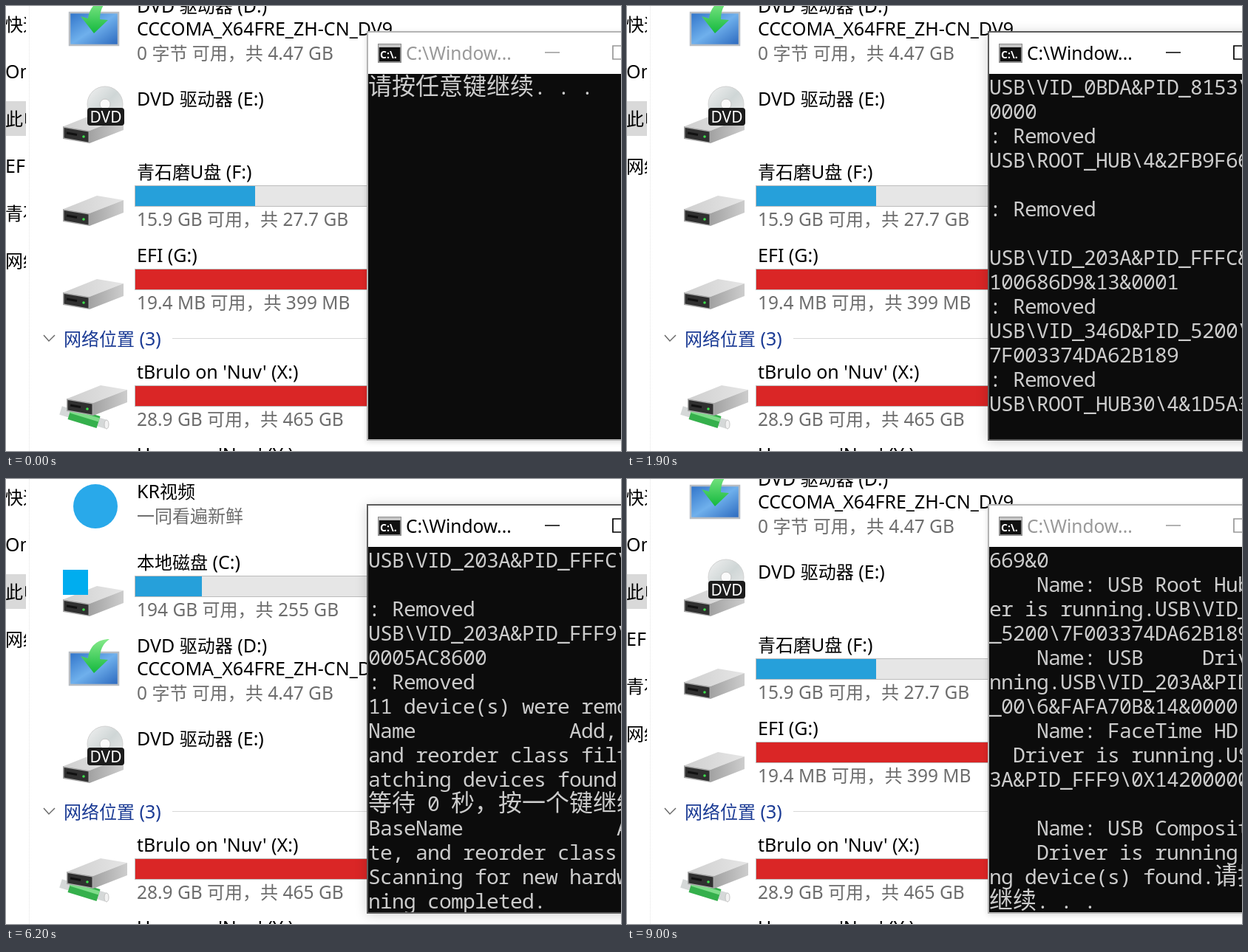
An HTML page for the animation above (9100 ms loop, 832 px wide and 603 px high).

```html
<!DOCTYPE html>
<html lang="zh-CN">
<head>
<meta charset="utf-8">
<title>Device rescan</title>
<style>
html, body { margin: 0; width: 100%; height: 100%; overflow: hidden; background: #fff; }
#stage {
  position: absolute; left: 0; top: 0; width: 832px; height: 603px; overflow: hidden; background: #fff;
  font: 25px/30px "Noto Sans", "Open Sans", "Noto Sans CJK SC", sans-serif; color: #000;
}
#stage div, #stage svg { position: absolute; }
b { font: normal .96em/0 "Noto Sans CJK SC", "Noto Sans CJK", sans-serif; }
.label { left: 177px; white-space: pre; }
.dim { color: #6d6d6d; font-size: 24.5px; }
.dim b { font-size: 24px; }
.bar { left: 174px; width: 380px; height: 27px; border: 1px solid #bcbcbc; background: #e6e6e6; }
.bar div { height: 27px; }

#side { left: 0; top: 0; width: 27px; height: 603px; overflow: hidden; }
#side .label { left: -1px; }
#picked { top: 129px; width: 27px; height: 47px; background: #d9d9d9; }
#rule { left: 31px; top: 0; height: 603px; border-left: 1px dotted #e4e4e4; }
#list, #net { left: 0; top: 0; width: 832px; height: 603px; }
#list svg, #net svg { left: 0; top: 0; overflow: visible; }
#list.full { top: -226px; }
#list:not(.full) .usb, #side:not(.full) .usb { display: none; }
#side:not(.full) .last { margin-top: -128px; }
#net .head { left: 78px; color: #1a3a94; }
#line { left: 225px; top: 450px; width: 300px; height: 1px; background: #d8d8d8; }

#win {
  left: 488px; top: 34px; width: 400px; height: 551px; border: 2px solid #b4b4b4;
  background: #fff; color: #999; box-shadow: 0 2px 7px rgba(0,0,0,.14);
}
#win.active { color: #000; border-color: #5c5c5c; box-shadow: 0 2px 15px rgba(0,0,0,.18); }
#title { left: 51px; top: 13px; font-size: 24.5px; }
#win svg { left: 0; top: 0; }
#term {
  left: 0; top: 56px; width: 400px; height: 495px; overflow: hidden; background: #0c0c0c; color: #ccc;
  font: 300 28px/33px "Noto Sans Mono", "DejaVu Sans Mono", monospace; letter-spacing: -.8px;
}
#rows { left: 0; top: 1px; white-space: pre; }
#rows p { margin: 0; height: 33px; }
#term b { font-size: 32px; font-weight: 300; letter-spacing: 0; }
#cursor { top: 487px; width: 16px; height: 8px; background: #fff; }
</style>
</head>
<body>
<div id="stage">
  <div id="side"><div id="picked"></div></div>
  <div id="rule"></div>

  <div id="list">
    <svg width="832" height="700">
      <defs>
        <linearGradient id="top" x2="1"><stop stop-color="#cfcfcf"/><stop offset="1" stop-color="#e6e6e6"/></linearGradient>
        <linearGradient id="edge" x2="1"><stop stop-color="#a2a2a2"/><stop offset="1" stop-color="#cdcdcd"/></linearGradient>
        <linearGradient id="screen" x2="1" y2="1"><stop stop-color="#2f73c9"/><stop offset=".5" stop-color="#6fb0ec"/><stop offset="1" stop-color="#2a67bd"/></linearGradient>
        <linearGradient id="disc" x2="1" y2="1"><stop stop-color="#f1f1f1"/><stop offset=".5" stop-color="#cfd6d6"/><stop offset="1" stop-color="#ececec"/></linearGradient>
        <linearGradient id="leaf" y2="1" x2="0"><stop stop-color="#86ea8a"/><stop offset="1" stop-color="#14b83e"/></linearGradient>
        <g id="drive">
          <path d="M1 18 46 0 82 6 36 24Z" fill="url(#top)"/>
          <path d="M36 24 82 6V23L36 41Z" fill="url(#edge)"/>
          <path d="M0 18 36 24V41L0 35Z" fill="#a8a8a8"/>
          <path d="M1.500 20 34.500 25.500V39.500L1.500 33.500Z" fill="#303030"/>
          <path d="M5 27 19 29.500" stroke="#111" stroke-width="3"/>
          <circle cx="28" cy="32" r="1.800" fill="#3be04a"/>
        </g>
      </defs>
      <circle cx="121" cy="37" r="30" fill="#29a9ea"/>
      <use href="#drive" x="77" y="145"/>
      <path d="M77 123H111V157H77Z" fill="#00adef"/>
      <path d="M86 235H152V279H86Z" fill="url(#screen)" stroke="#b7bcc2" stroke-width="2.500"/>
      <path d="M140 217C124 217 113 226 111 243L101 240 119 263 138 245 127 244C127 232 131 223 140 217Z" fill="url(#leaf)"/>
      <use href="#drive" x="77" y="371"/>
      <circle cx="134" cy="359" r="24" fill="url(#disc)" stroke="#d2d2d2"/>
      <circle cx="134" cy="359" r="7" fill="#fafafa" stroke="#c4c4c4"/>
      <rect x="110" y="364" width="50" height="24" rx="4" fill="#1c1c1c"/>
      <text x="135" y="383.500" text-anchor="middle" font-size="21" fill="#fff">DVD</text>
      <g class="usb"><use href="#drive" x="77" y="483"/><use href="#drive" x="77" y="596"/></g>
    </svg>
  </div>

  <div id="net">
    <div id="line"></div>
    <svg width="832" height="603" fill="none">
      <path d="M51 446 58 454 66 446" stroke="#6b6b6b" stroke-width="1.500"/>
      <path d="M74 548 136 567" stroke="#d5d8d8" stroke-width="12"/>
      <path d="M86 552 125 564" stroke="#35b04c" stroke-width="17"/>
      <path d="M87 549 126 561" stroke="#7fdc8a" stroke-width="5"/>
      <ellipse cx="136" cy="567" rx="3" ry="6" fill="#f2f2f2" stroke="#c4c4c4"/>
      <use href="#drive" x="82" y="514"/>
    </svg>
  </div>

  <div id="win">
    <svg width="342" height="56" fill="none">
      <path d="M14 16H44V40H14Z" fill="#111" stroke="#8c8c8c" stroke-width="2"/>
      <path d="M14 18H44" stroke="#c6c6c6" stroke-width="4"/>
      <text x="16" y="35" font-size="14" font-weight="700" fill="#fff">C:\.</text>
      <path d="M239 27H259M331 18H351V36H331Z" stroke="currentColor" stroke-width="1.700"/>
    </svg>
    <div id="title">C:\Window...</div>
    <div id="term"><div id="rows"></div><div id="cursor"></div></div>
  </div>
</div>

<script>
const $ = id => document.getElementById(id);
const LOOP = 9100, ROWS = 15;

// Wide characters get their own font and size.
const markup = s => s.replace(/&/g, '&amp;').replace(/[\u2e80-\uffef]+/g, '<b>$&</b>');

function add(parent, cls, top, html = '') {
  const el = document.createElement('div');
  el.className = cls;
  el.style.top = top + 'px';
  el.innerHTML = html;
  return parent.appendChild(el);
}
// y is the middle of the text line.
const label = (parent, y, text, cls = '') => add(parent, 'label ' + cls, y - 16, markup(text));

function volume(parent, y, name, space, used, color, cls = '') {
  label(parent, y, name, cls);
  add(parent, 'bar ' + cls, y + 18, `<div style="width:${used}px;background:${color}"></div>`);
  label(parent, y + 65, space, 'dim ' + cls);
}

const BLUE = '#26a0da', RED = '#da2626';
const side = $('side'), list = $('list'), net = $('net');

label(side, 25, '快速访问');
label(side, 89, 'On');
label(side, 153, '此电脑');
label(side, 217, 'EFI (G:)', 'usb');
label(side, 281, '青石磨U盘', 'usb');
label(side, 345, '网络', 'last');

label(list, 17, 'KR视频');
label(list, 51, '一同看遍新鲜', 'dim');
volume(list, 113, '本地磁盘 (C:)', '194 GB 可用，共 255 GB', 90, BLUE);
label(list, 226, 'DVD 驱动器 (D:)');
label(list, 257, 'CCCOMA_X64FRE_ZH-CN_DV9');
label(list, 291, '0 字节 可用，共 4.47 GB', 'dim');
label(list, 352, 'DVD 驱动器 (E:)');
volume(list, 451, '青石磨U盘 (F:)', '15.9 GB 可用，共 27.7 GB', 162, BLUE, 'usb');
volume(list, 564, 'EFI (G:)', '19.4 MB 可用，共 399 MB', 361, RED, 'usb');

label(net, 451, '网络位置 (3)', 'head');
volume(net, 496, "tBrulo on 'Nuv' (X:)", '28.9 GB 可用，共 465 GB', 356, RED);
label(net, 608, "Users on 'Nuv' (Y:)");

const scan = String.raw` class filters.USB\ROO
4&1387C2E6&0
    Name: USB Root Hub
er is running.USB\VID_
_8153\0003B6000000
    Name: Realtek USB
The device has a probl
669&0
    Name: USB Root Hub
er is running.USB\VID_
_5200\7F003374DA62B189
    Name: USB     Driv
nning.USB\VID_203A&PID
_00\6&FAFA70B&14&0000
    Name: FaceTime HD
  Driver is running.US
3A&PID_FFF9\0X14200000

    Name: USB Composit
    Driver is running.`;

const log = String.raw`请按任意键继续. . .
BaseName             Add
${scan}
ing device(s) found.Ba
           Add, delete
order class filters.US
UB20\4&1387C2E6&0
                    :
USB\VID_203A&PID_FFFC&
100686D9&13&0000
: Removed
USB\VID_0BDA&PID_8153\
0000
: Removed
USB\ROOT_HUB\4&2FB9F66

: Removed

USB\VID_203A&PID_FFFC&
100686D9&13&0001
: Removed
USB\VID_346D&PID_5200\
7F003374DA62B189
: Removed
USB\ROOT_HUB30\4&1D5A3

: Removed
USB\VID_203A&PID_FFFC&
100686D9&13&0002
: Removed
USB\VID_203A&PID_FFFC\

: Removed
USB\VID_203A&PID_FFF9\
0005AC8600
: Removed
11 device(s) were remo
Name             Add,
and reorder class filt
atching devices found.
等待 # 秒，按一个键继续
BaseName             A
te, and reorder class
Scanning for new hardw
ning completed.BaseNam
      Add, delete, and
${scan}
ng device(s) found.请按
继续. . .`.split('\n');

// [time, lines written, characters of the last line if it is unfinished]
const steps = [
  [0, 1], [300, 9], [400, 25, 20],
  [700, 27], [800, 29], [900, 30], [1000, 32], [1100, 34], [1200, 37],
  [1500, 39], [1600, 40], [1700, 42], [1800, 43], [1900, 45],
  [2000, 48], [2100, 51], [2200, 54], [2300, 58], [2400, 60],
  [3900, 61], [4000, 62], [4100, 63], [6200, 64, 15], [7200, 66, 15],
  [7600, 68], [7700, 70], [7800, 72, 6],
  [7900, 75], [8000, 78], [8100, 81], [8200, 84], [8300, 87]
];

const within = (t, from, to) => t >= from && t < to;

let shown = '';
function drawTerm(t) {
  const [, count, cut] = steps.findLast(s => s[0] <= t);
  const wait = t < 3000 ? 2 : t < 3900 ? 1 : 0;
  const key = [count, cut, wait].join();
  if (key === shown) return;
  shown = key;
  const lines = log.slice(Math.max(0, count - ROWS), count);
  if (cut) lines.push(lines.pop().slice(0, cut));
  $('rows').innerHTML = lines.map(s => `<p>${markup(s.replace('#', wait))}</p>`).join('');
}

function draw() {
  const t = performance.now() % LOOP;
  const atStart = within(t, 1200, 1500), afterDigit = within(t, 3000, 3700);
  drawTerm(t);
  $('cursor').style.display = atStart || afterDigit ? '' : 'none';
  $('cursor').style.left = (afterDigit ? 96 : 0) + 'px';
  $('win').classList.toggle('active', within(t, 200, 9000));
  side.classList.toggle('full', !within(t, 1900, 6600));
  list.classList.toggle('full', !within(t, 2000, 7200));
  requestAnimationFrame(draw);
}
draw();
</script>
</body>
</html>
```
